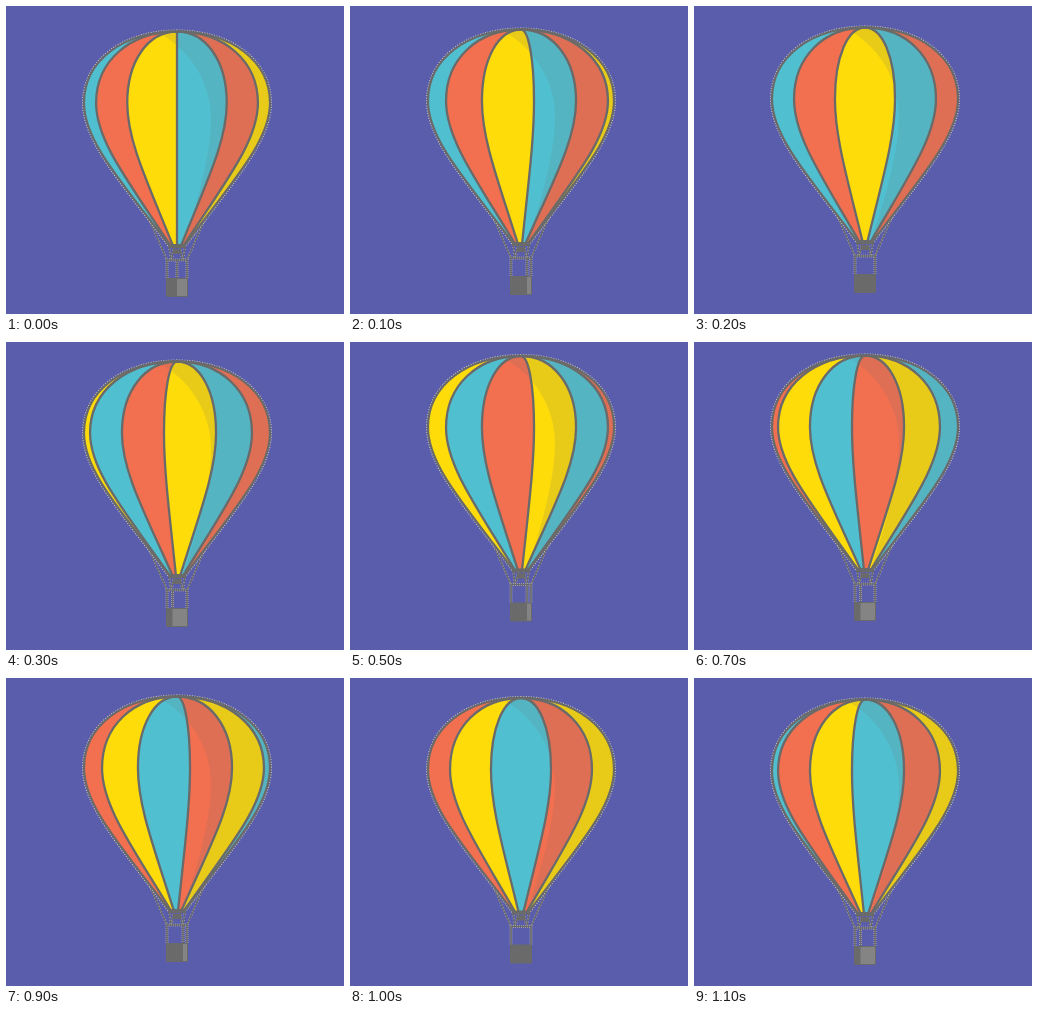
An HTML page with a canvas for the animation above (1.2 s loop, 338 px wide and 308 px high).

```html
<!DOCTYPE html>
<html lang="en">
<head>
<meta charset="utf-8">
<title>Hot-air balloon</title>
<style>
html, body { margin: 0; width: 100%; height: 100%; overflow: hidden; background: #5a5dac; }
canvas { display: block; width: 338px; height: 308px; }
</style>
</head>
<body>
<canvas id="stage" width="338" height="308"></canvas>
<script>
const ctx = document.getElementById('stage').getContext('2d');
const CX = 171, LOOP = 1200, STEP = 100;
const CYAN = '#50c0d1', ORANGE = '#f26f50', YELLOW = '#fedc0a';
const LINE = '#696a69', LIGHT = '#838483', HALO = '#cfcdae';
const colours = [CYAN, ORANGE, YELLOW];

// Vertical lift for each step of the loop
const lift = [0, 2, 4, 6, 8.7, 11.5, 13.5, 12, 9.5, 7, 5.5, 4];

// Four turning poses: seam positions across the envelope, and the basket corner
const poses = [
  { seams: [-.87, -.535, 0, .535, .87], corner: 171 },
  { seams: [-.806, -.42, .14, .592, .935], corner: 177 },
  { seams: [-.763, -.323, .323, .763], corner: 182 },
  { seams: [-.935, -.592, -.14, .42, .806], corner: 166.5 }
];

function side(path, k, up) {
  const x = v => CX + v * k;
  if (up) {
    path.lineTo(x(8), 239);
    path.bezierCurveTo(x(56), 175, x(93), 135, x(93), 97);
    path.bezierCurveTo(x(93), 55, x(54), 25.5, CX, 25.5);
  } else {
    path.moveTo(CX, 25.5);
    path.bezierCurveTo(x(54), 25.5, x(93), 55, x(93), 97);
    path.bezierCurveTo(x(93), 135, x(56), 175, x(8), 239);
  }
}

function gore(a, b) {
  const path = new Path2D();
  side(path, a, false);
  side(path, b, true);
  path.closePath();
  return path;
}

const body = gore(-1, 1);
const shade = new Path2D('M146 24C184 40 205 78 205 112C205 150 190 202 176 241H270V20Z');

function stroke(path, colour, width, dash = []) {
  ctx.setLineDash(dash);
  ctx.strokeStyle = colour;
  ctx.lineWidth = width;
  ctx.stroke(path);
  ctx.setLineDash([]);
}

const ropes = new Path2D();
for (const s of [-1, 1]) {
  ropes.moveTo(CX + s * 28, 213);
  ropes.lineTo(CX + s * 10, 254);
  ropes.moveTo(CX + s * 8, 240);
  ropes.lineTo(CX + s * 6, 254);
  ropes.moveTo(CX + s * 3, 241);
  ropes.lineTo(CX + s * 5, 252);
}

function drawBasket(corner) {
  stroke(ropes, HALO, 2, [1, 2]);
  stroke(ropes, LINE, 1.2);
  const frame = new Path2D('M161 253V273M181 253V273M161 254H181');
  if (corner < 180) {
    frame.moveTo(corner, 254);
    frame.lineTo(corner, 273);
  }
  stroke(frame, HALO, 2.6, [1, 1]);
  stroke(frame, LINE, 1.6);

  ctx.fillStyle = LINE;
  ctx.fillRect(167, 243, 8, 5);
  ctx.beginPath();
  ctx.roundRect(160, 272, 22, 19, 1.5);
  ctx.fill();
  if (corner < 180) {
    ctx.fillStyle = LIGHT;
    ctx.fillRect(corner, 273, 181 - corner, 17);
  }
}

function drawEnvelope(seams, shift) {
  stroke(body, HALO, 4, [1, 1.5]);
  const edges = [-1, ...seams, 1];
  for (let i = 0; i < edges.length - 1; i++) {
    ctx.fillStyle = colours[(i + 9 - shift) % 3];
    ctx.fill(gore(edges[i], edges[i + 1]));
  }
  ctx.save();
  ctx.clip(body);
  ctx.fillStyle = 'rgba(106,106,106,.15)';
  ctx.fill(shade);
  ctx.restore();

  for (const k of seams) {
    const seam = new Path2D();
    side(seam, k, false);
    stroke(seam, LINE, 2.3);
  }
  stroke(body, LINE, 2.2);
  stroke(new Path2D('M162 240.5H180'), LINE, 3);
}

function draw(now) {
  const step = Math.floor((now % LOOP) / STEP);
  const pose = poses[step % 4];
  const shift = Math.floor((step + 1) / 4);
  ctx.fillStyle = '#5a5dac';
  ctx.fillRect(0, 0, 338, 308);
  ctx.save();
  ctx.translate(0, -lift[step]);
  ctx.lineJoin = 'round';
  drawBasket(pose.corner);
  drawEnvelope(pose.seams, shift);
  ctx.restore();
}

let start;
function tick(now) {
  start ??= now;
  draw(Math.max(0, now - start));
  requestAnimationFrame(tick);
}
draw(0);
requestAnimationFrame(tick);
</script>
</body>
</html>
```
